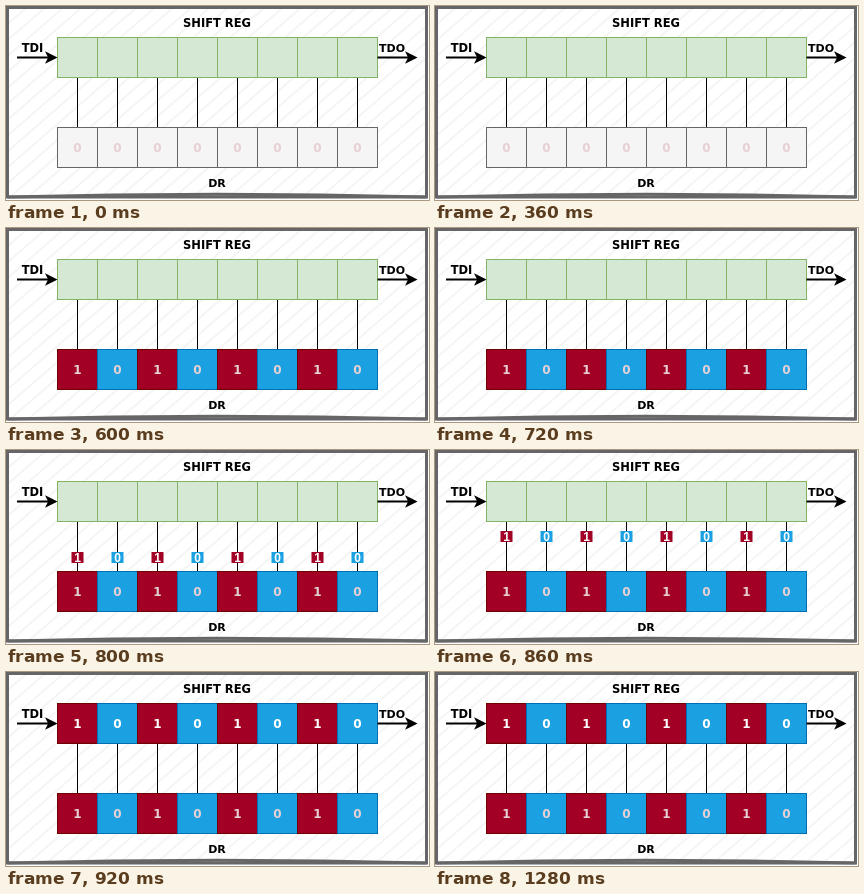
These frames come from a looping animation (423x194 px, 1520 ms). An HTML page with a canvas:

```html
<!DOCTYPE html>
<html lang="en">
<head>
<meta charset="utf-8">
<title>Shift register capture</title>
<style>
html, body { margin: 0; width: 100%; height: 100%; overflow: hidden; background: #fff; }
canvas { display: block; width: 423px; height: 194px; }
</style>
</head>
<body>
<canvas id="stage" width="423" height="194"></canvas>
<script>
const ctx = document.getElementById('stage').getContext('2d');
const W = 423, H = 194, LOOP = 1520;
const LOAD = 600, MOVE = 800, STEP = 60, DONE = 920;
const LEFT = 51.5, CELL = 40, BITS = [1, 0, 1, 0, 1, 0, 1, 0];
const GREEN = ['#d5e8d4', '#82b366'];
const GREY = ['#f5f5f5', '#666666'];
const RED = ['#a20025', '#6f0000'];
const BLUE = ['#1ba1e2', '#006eaf'];
const PALE = '#e6d0d4';
const WIDE = '"DejaVu Sans", sans-serif';
const PLAIN = '"Liberation Sans", sans-serif';

const bitColors = bit => bit ? RED : BLUE;
const centerX = i => LEFT + CELL * (i + 0.5);

function line(x1, y1, x2, y2, color, width) {
  ctx.strokeStyle = color;
  ctx.lineWidth = width;
  ctx.beginPath();
  ctx.moveTo(x1, y1);
  ctx.lineTo(x2, y2);
  ctx.stroke();
}

function box(x, y, w, h, [fill, edge]) {
  ctx.fillStyle = fill;
  ctx.fillRect(x, y, w, h);
  ctx.strokeStyle = edge;
  ctx.lineWidth = 1;
  ctx.strokeRect(x, y, w, h);
}

function label(text, x, y, color = '#000', size = 11.5, family = WIDE) {
  ctx.font = `bold ${size}px ${family}`;
  ctx.textAlign = 'center';
  ctx.textBaseline = 'alphabetic';
  ctx.fillStyle = color;
  ctx.fillText(text, x, y);
}

function arrow(x1, x2, y) {
  const tip = x2 - 2.24;
  line(x1, y, tip - 6, y, '#000', 2);
  ctx.fillStyle = '#000';
  ctx.beginPath();
  ctx.moveTo(tip, y);
  ctx.lineTo(tip - 8, y + 4);
  ctx.lineTo(tip - 6, y);
  ctx.lineTo(tip - 8, y - 4);
  ctx.closePath();
  ctx.fill();
  ctx.stroke();
}

function panel() {
  ctx.fillStyle = '#fff';
  ctx.fillRect(0, 0, W, H);
  ctx.save();
  ctx.beginPath();
  ctx.rect(2, 2, 418, 188);
  ctx.clip();
  const angle = 41 * Math.PI / 180;
  const run = 188 / Math.tan(angle), gap = 12 / Math.sin(angle);
  for (let x = 2; x < W + run; x += gap) line(x - run, 190, x, 2, '#f5f5f5', 2);
  ctx.restore();

  // A straight and a bowed bottom stroke give the hand-drawn edge.
  ctx.strokeStyle = '#666';
  ctx.lineWidth = 3;
  ctx.strokeRect(1.5, 1.5, 419, 189.5);
  ctx.beginPath();
  ctx.moveTo(1.5, 191);
  ctx.quadraticCurveTo(211, 185.6, 420.5, 191);
  ctx.stroke();
}

function register(y, bits, colorsOf, digitColor) {
  bits.forEach((bit, i) => {
    box(LEFT + i * CELL, y, CELL, CELL, colorsOf(bit));
    if (digitColor) label(bit, centerX(i), y + 24.5, digitColor, 12);
  });
}

function token(bit, x, y) {
  ctx.fillStyle = bitColors(bit)[0];
  ctx.fillRect(x - 6, y - 5.5, 12, 11);
  label(bit, x, y + 4.5, '#fff', 12, PLAIN);
}

function draw(t) {
  const loaded = t >= LOAD, done = t >= DONE;
  panel();
  label('SHIFT REG', 211, 21);
  label('DR', 211, 181, '#000', 11);
  label('TDI', 26.5, 46);
  label('TDO', 386, 46, '#000', 11);

  BITS.forEach((_, i) => line(centerX(i), 72, centerX(i), 121, '#000', 1));

  register(31.5, BITS, done ? bitColors : () => GREEN, done && '#fff');
  if (loaded) register(121.5, BITS, bitColors, PALE);
  else register(121.5, BITS.map(() => 0), () => GREY, PALE);

  arrow(11, 51.5, 51.5);
  arrow(371.5, 411.5, 51.5);

  // The copied bits climb in whole steps.
  if (t >= MOVE && !done) {
    const y = 107.5 - 21 * Math.floor((t - MOVE) / STEP);
    BITS.forEach((bit, i) => token(bit, centerX(i), y));
  }
}

const start = performance.now();
function tick() {
  draw((performance.now() - start) % LOOP);
  requestAnimationFrame(tick);
}
tick();
</script>
</body>
</html>
```
